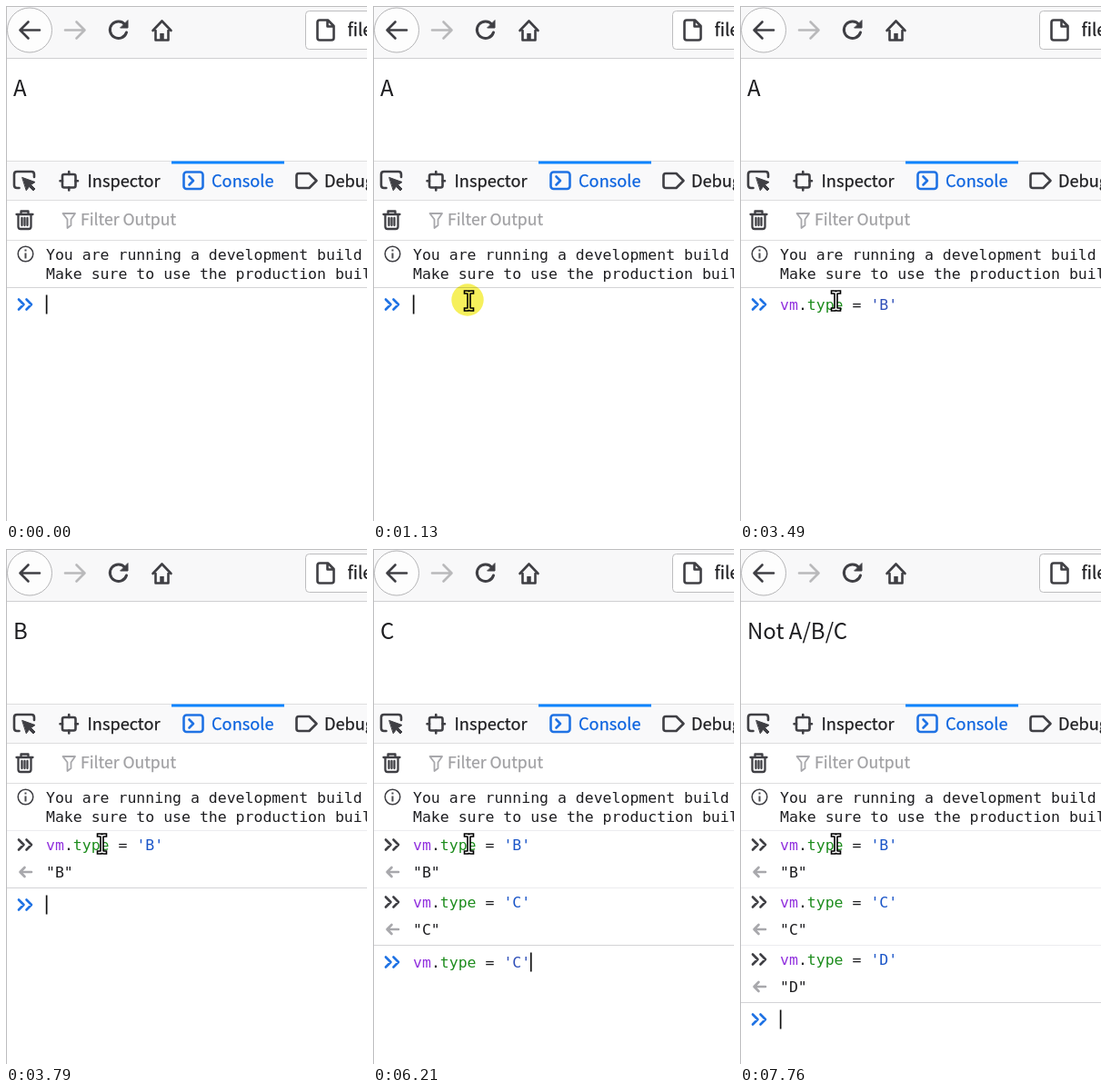
An HTML page that plays this animation: 397 px wide and 566 px high, repeating every 8 s.

```html
<!DOCTYPE html>
<html lang="en">
<head>
<meta charset="utf-8">
<title>Console demo</title>
<style>
  html, body { margin: 0; width: 100%; height: 100%; overflow: hidden; background: #fff; }
  svg { display: block; width: 397px; height: 566px; }
  text { white-space: pre; font-size: 18px; fill: #1d1d20;
    font-family: "Noto Sans CJK JP", "Noto Sans CJK SC", "Noto Sans CJK", "Noto Sans", sans-serif; }
  .label { font-size: 18.2px; fill: currentColor; stroke: currentColor; stroke-width: .25; color: #1d1d20; }
  .mono { font: 16.5px "DejaVu Sans Mono", monospace; }
  .icon { fill: none; stroke: #3f3f44; stroke-width: 2.6; stroke-linejoin: round; stroke-linecap: round; }
  .blue { stroke: #1f72e4; }
  .dim { stroke: #a8a8ac; }
  .obj { fill: #9130de; }
  .prop { fill: #1c8c1c; }
  .str { fill: #1a55c8; }
  #input .str { fill: #2f4fb8; }
  #halo { mix-blend-mode: multiply; }
</style>
</head>
<body>
<svg viewBox="0 0 397 566">
  <defs>
    <path id="beam" d="M-3.500 -9.500H-2Q0 -9.500 0 -7.500Q0 -9.500 2 -9.500H3.500M0 -7.500V7.500M-3.500 9.500H-2Q0 9.500 0 7.500Q0 9.500 2 9.500H3.500"/>
  </defs>
  <rect width="397" height="566" fill="#fff"/>

  <!-- browser bar -->
  <rect width="397" height="57" fill="#f8f8f9"/>
  <path d="M0 57.5H397" stroke="#cfcfd1"/>
  <circle cx="26" cy="26.5" r="24.5" fill="#fdfdfd" stroke="#b4b4b6"/>
  <g class="icon">
    <path d="M37 26.5H16M24.500 17.500L15.500 26.500L24.500 35.500"/>
    <path d="M65 26.500H86M77.500 17.500L86.500 26.500L77.500 35.500" stroke="#b9b9bb"/>
    <path d="M131 20.500A9.300 9.300 0 1 0 132.500 29" stroke-width="3"/>
    <path d="M134 16V24H126Z" fill="#3f3f44" stroke-width="1"/>
    <path d="M161.500 27L171.500 16.500L181.500 27M164.500 27V37.500H178.500V27"/>
    <path d="M171.500 37V30" stroke-width="4.500" stroke-linecap="butt"/>
  </g>
  <rect x="329.500" y="5.500" width="90" height="42" rx="4" fill="#fff" stroke="#bdbdbf"/>
  <path class="icon" d="M345 15.500H354L360.500 22V35Q360.500 37.500 358 37.500H345Q342.500 37.500 342.500 35V18Q342.500 15.500 345 15.500ZM353.500 16V22.500H360"/>
  <text class="label" x="375.500" y="33" style="font-size:19px">file:///</text>

  <text id="page" x="8" y="98.500" style="font-size:24px">A</text>

  <!-- tool tabs -->
  <rect y="170" width="397" height="43" fill="#f9f9fa"/>
  <path d="M0 170.500H397M0 213.500H397M0 257.500H397" stroke="#dededf"/>
  <rect x="182" y="170.500" width="124" height="3" fill="#0a84ff"/>
  <g class="icon">
    <path d="M14.500 200H12Q9 200 9 197V185Q9 182 12 182H28Q31 182 31 185V188"/>
    <path d="M18 188.500L32 193.500L27.500 196.500L32 201L30 203L25.500 198.500L22.500 202.500Z" fill="#3f3f44" stroke-width="1"/>
    <rect x="62" y="185" width="14.500" height="14.500" rx="2"/>
    <path d="M69.250 182V185M69.250 199.500V202.500M59.500 192.250H62M76.500 192.250H79"/>
    <rect class="blue" x="195.500" y="182.500" width="21" height="18.500" rx="3"/>
    <path class="blue" d="M201.500 187.500L206 192L201.500 196.500"/>
    <path d="M322 184H333.500L341.500 192L333.500 200H322Q319.500 200 319.500 197.500V186.500Q319.500 184 322 184Z"/>
  </g>
  <text class="label" x="89.500" y="198.500">Inspector</text>
  <text class="label" x="226" y="198.500" style="color:#0a62df">Console</text>
  <text class="label" x="350" y="198.500">Debugger</text>

  <!-- filter bar -->
  <g class="icon">
    <path style="stroke-width:2.300" d="M11.500 229H29.500M16.500 228.500V225.500H24.500V228.500M13.500 229.500V242.500Q13.500 245 16 245H25Q27.500 245 27.500 242.500V229.500M17.500 233V241M20.500 233V241M23.500 233V241"/>
    <path class="dim" style="stroke-width:1.800" d="M62.500 228H76L71.500 234.500V241L67.500 244V234.500Z"/>
  </g>
  <text class="label" x="82" y="241" style="font-size:17.600px;color:#a0a0a3">Filter Output</text>

  <!-- message -->
  <circle class="icon" style="stroke-width:1.500" cx="21.500" cy="272.500" r="8.300"/>
  <path d="M21.500 271.500V277.500M21.500 267.500V269.500" stroke="#4a4a4f" stroke-width="2"/>
  <text class="mono" x="44" y="278.700">You are running a development build of Vue.</text>
  <text class="mono" x="44" y="299.700">Make sure to use the production build</text>

  <g id="log"></g>

  <g id="prompt">
    <path d="M0 309.500H397" stroke="#d3d3d6"/>
    <path class="icon blue" d="M14 322.500L19.500 328L14 333.500M22.500 322.500L28 328L22.500 333.500"/>
    <text id="input" class="mono" x="44" y="334"></text>
    <rect id="caret" y="317.500" width="1.700" height="21" fill="#111"/>
  </g>

  <path d="M0 .5H397M.5 0V566" stroke="#bdbdbf"/>

  <g id="pointer" fill="none" stroke-linecap="square">
    <use href="#beam" stroke="#000" stroke-width="4.600"/>
    <use href="#beam" stroke="#fff" stroke-width="1.400"/>
  </g>
  <circle id="halo" cx="104" cy="323" r="17.700" fill="#f6f05c"/>
</svg>

<script>
const LOOP = 8000, ROW = 63, CHAR = 9.933;
const $ = id => document.getElementById(id);

// [time, letter in the input line or ""]
const typed = [[0, ""], [2000, "D"], [2700, "C"], [2940, "B"], [3720, ""],
  [4510, "B"], [4740, "D"], [5120, "C"], [5670, ""],
  [6210, "C"], [6360, "B"], [7140, "D"], [7680, ""]];

// [command echoed, result shown, letter, page text]
const runs = [[3720, 3790, "B", "B"], [5670, 5750, "C", "C"], [7680, 7760, "D", "Not A/B/C"]];

const caretOff = [[210, 750], [1830, 2000], [2550, 2700], [3490, 3720], [4270, 4510], [6910, 7140]];

const path = [[392, 550], [372, 484], [332, 400], [292, 350], [253, 322],
  [208, 295], [168, 286], [136, 292], [114, 310], [105.5, 324]];
const MOVE_START = 210, MOVE_END = 900;

const within = (t, [a, b]) => t >= a && t < b;
const show = (el, on) => el.setAttribute("visibility", on ? "visible" : "hidden");
const command = c =>
  `<tspan class="obj">vm</tspan>.<tspan class="prop">type</tspan> = <tspan class="str">'${c}'</tspan>`;

$("log").innerHTML = runs.map(([, , c], i) => `
  <g transform="translate(0 ${i * ROW})">
    <path d="M0 309.5H397" stroke="#ececef"/>
    <path class="icon" d="M14 319.5L19.500 325L14 330.5M22.500 319.5L28 325L22.500 330.5"/>
    <text class="mono" x="44" y="331">${command(c)}</text>
    <g>
      <path class="icon dim" d="M28 355H16M20.500 350L15.500 355L20.500 360"/>
      <text class="mono" x="44" y="361">"${c}"</text>
    </g>
  </g>`).join("");
const rows = [...$("log").children];

let shown = null;

function render(t) {
  let shift = 0, page = "A";
  runs.forEach(([echo, result, , text], i) => {
    const done = t >= result;
    rows[i].style.display = t >= echo ? "" : "none";
    rows[i].lastElementChild.style.display = done ? "" : "none";
    if (done) page = text;
    shift += done ? ROW : t >= echo ? ROW / 2 : 0;
  });
  $("page").textContent = page;
  $("prompt").setAttribute("transform", `translate(0 ${shift})`);

  const letter = typed.filter(s => t >= s[0]).pop()[1];
  if (letter !== shown) {
    $("input").innerHTML = letter && command(letter);
    $("caret").setAttribute("x", 43.8 + (letter ? 13 * CHAR : 0));
    shown = letter;
  }
  show($("caret"), !caretOff.some(span => within(t, span)));

  const last = path.length - 1;
  const step = Math.floor((t - MOVE_START) / (MOVE_END - MOVE_START) * last);
  const [x, y] = path[Math.max(0, Math.min(last, step))];
  $("pointer").setAttribute("transform", `translate(${x} ${y})`);
  show($("pointer"), t >= MOVE_START);
  show($("halo"), within(t, [1130, 1360]));
}

const start = performance.now();
function tick(now) {
  render(Math.max(0, now - start) % LOOP);
  requestAnimationFrame(tick);
}
render(0);
requestAnimationFrame(tick);
</script>
</body>
</html>
```
